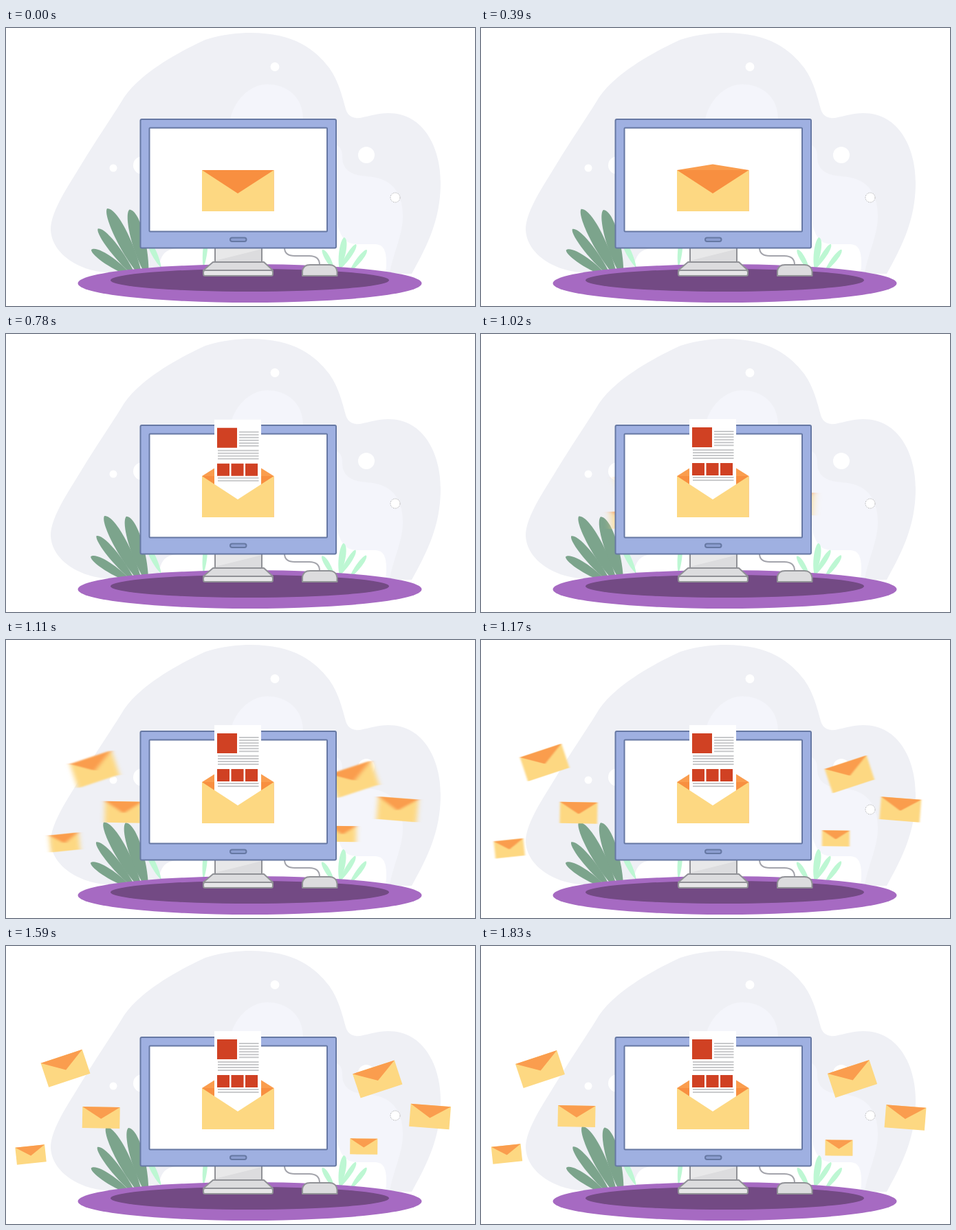
Animation of 682x405 px, one loop 1860 ms. Source, as an HTML page:

```html
<!DOCTYPE html>
<html lang="en">
<head>
<meta charset="utf-8">
<title>Mail animation</title>
<style>
  html, body { margin: 0; width: 100%; height: 100%; overflow: hidden; background: #fff; }
  svg { display: block; }
  .line { stroke: #6678a3; stroke-width: 2; }
  .grey { stroke: #909196; stroke-width: 2; stroke-linejoin: round; }
</style>
</head>
<body>
<svg width="682" height="405" viewBox="0 0 682 405">
  <defs>
    <filter id="blur" x="-30%" y="-30%" width="160%" height="160%">
      <feGaussianBlur id="smear" stdDeviation="0 0"/>
    </filter>
    <clipPath id="pocket"><path d="M285 0H390V267H285Z"/></clipPath>
  </defs>

  <!-- backdrop -->
  <path fill="#eff0f5" d="M65 292C66 265 92 228 110 198C130 165 150 136 168 107C188 72 240 40 290 17C315 9 340 7 355 7C420 7 450 32 470 58C484 78 489 100 494 118C497 128 504 132 515 131C530 128 540 124 556 124C608 124 632 175 632 225C632 280 612 318 590 358L150 356C110 356 65 330 65 292Z"/>
  <path fill="#f4f5fb" d="M326 133C332 105 355 82 380 82C408 82 432 100 432 133ZM470 168C485 169 490 177 489 190C490 207 503 215 524 216C560 218 577 238 577 275C577 302 562 330 558 358H470Z"/>
  <path fill="#fff" d="M222 350C225 328 234 321 252 321H480V270C483 300 490 315 512 315H538C552 316 555 330 552 358H222Z"/>
  <g fill="#fff">
    <circle cx="391" cy="56.500" r="6.500"/>
    <circle cx="156" cy="204" r="5.500"/>
    <circle cx="198" cy="200" r="13"/>
    <circle cx="524" cy="185" r="12"/>
    <circle cx="566" cy="247" r="7" stroke="#aaa" stroke-width=".7" stroke-dasharray="2 1"/>
  </g>

  <g id="leaves"></g>

  <!-- ground -->
  <ellipse cx="354.500" cy="372" rx="250" ry="28" fill="#a66ac2"/>
  <ellipse cx="354.500" cy="367.500" rx="202.500" ry="16.500" fill="#734a84"/>

  <g id="mails" filter="url(#blur)"></g>

  <!-- computer -->
  <path class="grey" fill="none" d="M405 320C405 329 411 332 420 332H441C451 332 456 337 456 345" style="stroke:#a3a4ab"/>
  <path class="grey" fill="#dcdcde" d="M431 361V354C432 348 436 345 442 345H470C477 345 481 349 481.500 355V361Z"/>
  <path fill="#e8e8e9" d="M304 320H372V341H304Z"/>
  <path fill="#dcdcde" d="M372 322V341H304V339Z"/>
  <path class="grey" fill="none" d="M304 320V341M372 320V341"/>
  <path class="grey" fill="#dcdcde" d="M301 341H375L388 353H287Z"/>
  <rect class="grey" fill="#e6e6e7" x="287" y="353" width="101" height="8" rx="2.500"/>
  <rect class="line" fill="#9fb0e1" x="195.500" y="133" width="284.500" height="187.500" rx="2"/>
  <rect class="line" fill="#fff" x="208.500" y="145.500" width="258.500" height="151" rx="1"/>
  <rect class="line" fill="#8c9ed0" x="326" y="305.500" width="23.500" height="5.500" rx="2.700"/>

  <!-- open envelope -->
  <path fill="#f88f40" d="M285 207H389.500V267H285Z"/>
  <path id="flap"/>
  <g clip-path="url(#pocket)"><g id="letter"></g></g>
  <path fill="#fdd882" d="M285 207L337 241L389.500 207V267H285Z"/>
</svg>

<script>
const LOOP = 1860, FLAP = 33;
const $ = id => document.getElementById(id);

function add(parent, tag, attrs) {
  const el = document.createElementNS("http://www.w3.org/2000/svg", tag);
  for (const k in attrs) el.setAttribute(k, attrs[k]);
  return parent.appendChild(el);
}

// progress of t between two times, 0 to 1
const span = (t, from, to) => Math.min(1, Math.max(0, (t - from) / (to - from)));
const smooth = p => (1 - Math.cos(Math.PI * p)) / 2;

// tip x, tip y, base x, base y, half width, colour, sway in degrees
const DARK = "#7ca48c", PALE = "#bdf7d3";
const leaves = [
  [205, 308, 226, 350, 5, PALE, 1],
  [291, 305, 287, 350, 4, PALE, 1],
  [320, 310, 300, 350, 4, PALE, 1],
  [492, 305, 485, 352, 6, PALE, 1.5],
  [509, 315, 485, 352, 4.500, PALE, 1.5],
  [524.500, 323, 499, 356, 4.500, PALE, 1.5],
  [460, 323, 478, 354, 4.500, PALE, 1.5],
  [124, 323, 184, 362, 8, DARK, 1.5],
  [133.500, 292.500, 190, 364, 8.500, DARK, 2],
  [147, 263, 199, 366, 11.500, DARK, 2.800],
  [179.500, 264.500, 207, 366, 12, DARK, 3.200]
].map(([tx, ty, bx, by, w, fill, sway]) => {
  const dx = tx - bx, dy = ty - by, len = Math.hypot(dx, dy);
  const nx = -dy / len * w, ny = dx / len * w;
  const at = (p, s) => `${bx + dx * p + nx * s} ${by + dy * p + ny * s}`;
  const d = `M${at(0, 0)}C${at(.35, 1.1)} ${at(.95, 1.3)} ${at(1, 0)}C${at(.95, -.9)} ${at(.35, -1.1)} ${at(0, 0)}Z`;
  return { el: add($("leaves"), "path", { d, fill }), bx, by, sway };
});

// resting x, y, then drifted x, y, width, height, angle
const mails = [
  [87, 177, 86, 179.500, 63.500, 37, -18.400],
  [137.500, 252, 139, 248, 54.500, 31, 1],
  [34.500, 305, 37.500, 303, 43, 25, -6],
  [540.500, 194.500, 540, 193.500, 64, 37, -18.200],
  [616, 247, 617, 250, 58.500, 33, 4.500],
  [520, 290, 520.500, 294, 40, 23, .5]
].map(([x1, y1, x2, y2, w, h, angle]) => {
  const el = add($("mails"), "g");
  add(el, "rect", { x: -w / 2, y: -h / 2, width: w, height: h, fill: "#fdd882" });
  add(el, "path", { d: `M${-w / 2} ${-h / 2}h${w}L0 ${h * .06}Z`, fill: "#fa9d4e" });
  return { el, x1, y1, x2, y2, angle };
});

// letter, at its raised position
const block = (x, y, width, height, fill) => add($("letter"), "rect", { x, y, width, height, fill });
const RED = "#d04123";
block(303, 124, 68, 145, "#fff");
block(307, 136, 29, 29, RED);
for (const x of [307, 327.500, 348]) block(x, 188, 18, 18, RED);
for (let i = 0; i < 6; i++) block(339, 141 + i * 4.050, 28.500, 2, "#c8c9cb");
for (const y of [168, 172, 176, 180, 208, 212]) block(308, y, 59.500, 2, "#c8c9cb");

function draw(t) {
  const swing = t < 1100 ? smooth(t / 1100) : smooth((LOOP - t) / (LOOP - 1100));
  for (const { el, bx, by, sway } of leaves)
    el.setAttribute("transform", `rotate(${-sway * swing} ${bx} ${by})`);

  const apex = 207 + FLAP * Math.cos(Math.PI * smooth(span(t, 225, 525)));
  $("flap").setAttribute("d", `M285 207L337 ${apex}L389.5 207Z`);
  $("flap").setAttribute("fill", apex > 207 ? "#f88f40" : "#fa9d4e");

  const drop = 120 * (1 - smooth(span(t, 420, 800)));
  $("letter").setAttribute("transform", `translate(0 ${drop})`);

  const left = 1 - span(t, 960, 1200);
  const out = 1 - left ** 1.8;
  const drift = span(t, 1170, 1830) ** 1.5;
  $("mails").style.display = t < 960 ? "none" : "";
  if (left > 0) $("mails").setAttribute("filter", "url(#blur)");
  else $("mails").removeAttribute("filter");
  $("smear").setAttribute("stdDeviation", `${8 * left ** .8} 0`);
  for (const { el, x1, y1, x2, y2, angle } of mails) {
    const x = 337 + (x1 - 337) * out + (x2 - x1) * drift;
    const y = 245 + (y1 - 245) * out + (y2 - y1) * drift;
    el.setAttribute("transform", `translate(${x} ${y}) rotate(${angle})`);
  }
}

const start = performance.now();
function tick() {
  draw((performance.now() - start) % LOOP);
  requestAnimationFrame(tick);
}
tick();
</script>
</body>
</html>
```
